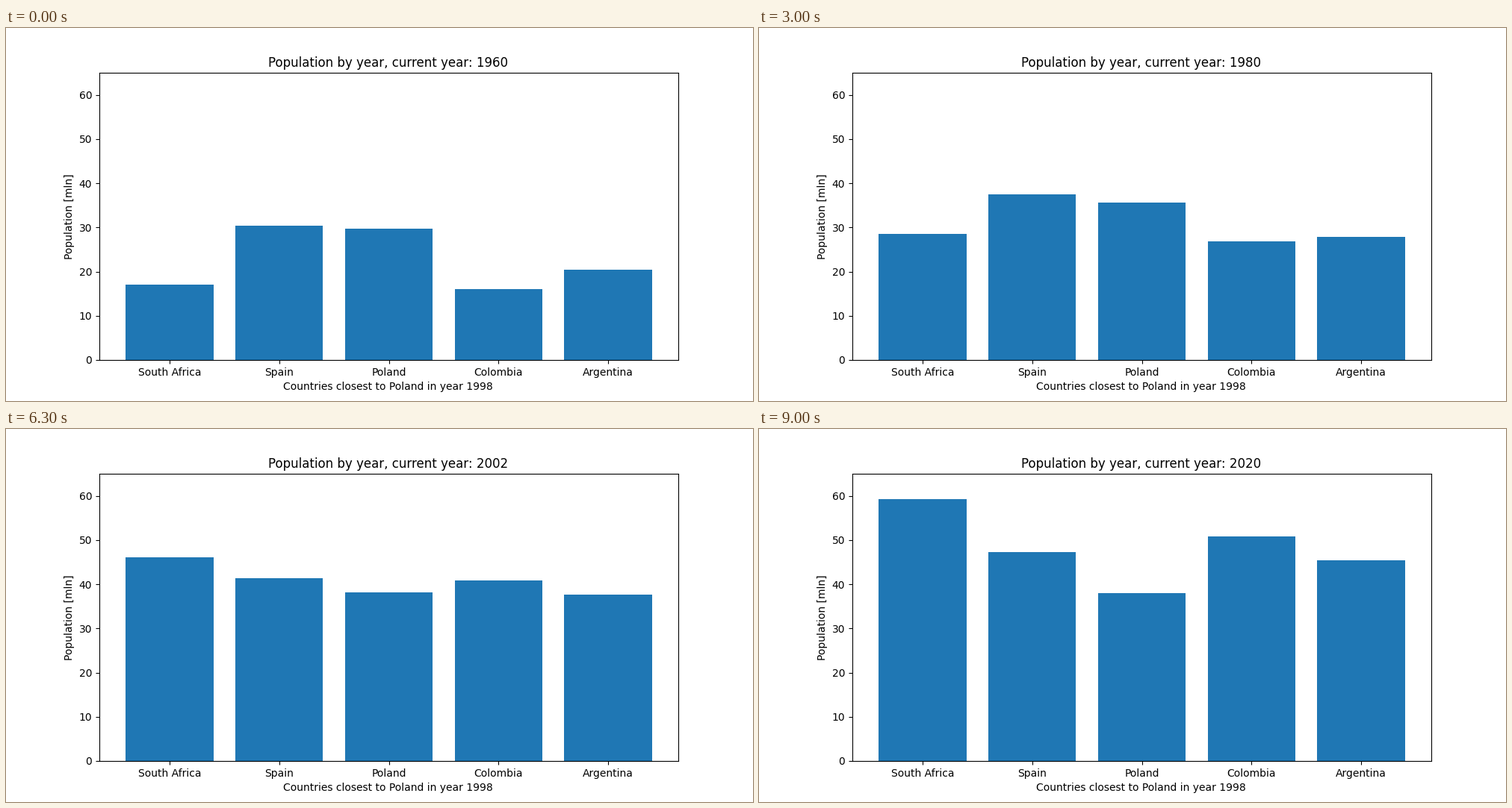
A matplotlib script for the animation above (9150 ms loop, 1000x500 px).

```python
import numpy as np
import matplotlib.pyplot as plt
from matplotlib.animation import FuncAnimation

FIRST, LAST = 1960, 2020
STEP_MS = 150
MIDDLE = 0.499  # keeps centred text on the left side of the half pixel

# Population in millions at the turning points of the curves.
KEY_YEARS = np.array([1960, 1970, 1980, 1989, 1997, 2001, 2007, 2013, 2020])
KEYS = {
    "South Africa": [17.1, 22.07, 28.56, 35.98, 43.07, 45.57, 49.12, 53.6, 59.31],
    "Spain": [30.46, 33.81, 37.49, 38.79, 40.06, 40.85, 45.23, 46.62, 47.35],
    "Poland": [29.64, 32.6, 35.57, 37.96, 38.66, 38.25, 38.12, 38.04, 37.95],
    "Colombia": [16.06, 21.48, 26.9, 32.45, 37.7, 40.26, 43.74, 46.5, 50.88],
    "Argentina": [20.48, 23.84, 27.9, 32.13, 35.65, 37.28, 39.68, 42.2, 45.38],
}


def smooth(values, years):
    """Cubic Hermite curve through the key points."""
    x, y = KEY_YEARS, np.array(values)
    slope = np.gradient(y, x)
    i = np.clip(np.searchsorted(x, years, side="right") - 1, 0, len(x) - 2)
    h = x[i + 1] - x[i]
    t = (years - x[i]) / h
    blend = t * t * (3 - 2 * t)
    return (y[i] * (1 - blend) + y[i + 1] * blend
            + h * t * (1 - t) * ((1 - t) * slope[i] - t * slope[i + 1]))


years = np.arange(FIRST, LAST + 1)
heights = np.array([smooth(values, years) for values in KEYS.values()]).T

fig, ax = plt.subplots(figsize=(10, 5), dpi=100)
bars = ax.bar(list(KEYS), heights[0], color="#1f77b4")
ax.set_ylim(0, 65)
ax.set_xlabel("Countries closest to Poland in year 1998", x=MIDDLE)
ax.set_ylabel("Population [mln]")
title = ax.set_title("", x=MIDDLE)


def update(n):
    for bar, height in zip(bars, heights[n]):
        bar.set_height(height)
    title.set_text(f"Population by year, current year: {years[n]}")
    return [*bars, title]


anim = FuncAnimation(fig, update, frames=len(years), interval=STEP_MS,
                     repeat=True, repeat_delay=0, blit=False)
plt.show()
```
